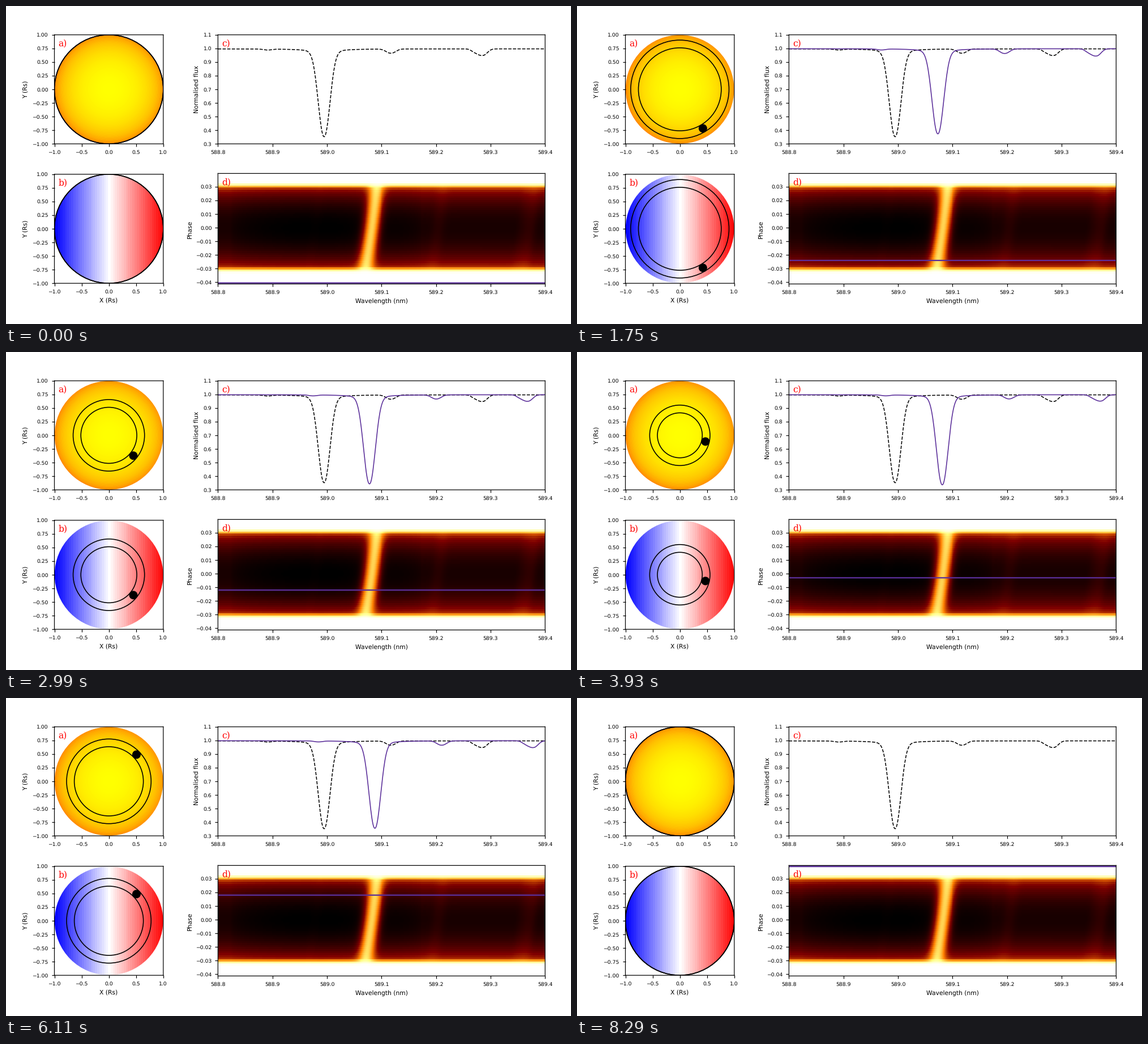
Write a matplotlib script that moves like this. It is 998x561 px and loops after 8.46 s.

```python
import numpy as np
import matplotlib.pyplot as plt
from matplotlib.animation import FuncAnimation
from matplotlib.patches import Circle
from matplotlib.ticker import MultipleLocator

W, H, DPI = 998, 561, 64
PX = 72 / DPI                      # one pixel in points
LOOP, TICK = 8460, 60
STEPS = 54
PURPLE = "#5b2f9a"
R_PLANET = 0.071
LIMB = 0.52
NM_PER_PX = 0.6 / 578

plt.rcParams.update({
    "font.family": "DejaVu Sans",
    "text.hinting": "none",
    "path.snap": False,
    "axes.linewidth": 1.23 * PX,
    "xtick.labelsize": 9.25 * PX, "ytick.labelsize": 9.25 * PX,
})
for side in ("xtick", "ytick"):
    plt.rcParams[side + ".major.size"] = 5.2 * PX
    plt.rcParams[side + ".major.pad"] = 5.6 * PX
    plt.rcParams[side + ".major.width"] = 1.23 * PX


# --- model -----------------------------------------------------------------

def phase_at(step):
    return -0.0405 + 0.0015 * step


def planet_xy(phase):
    x = 0.4755 + 1.95 * phase - 9.4 * phase ** 2
    y = 4.585 * np.sin(2 * np.pi * phase) - 0.0275
    return x, y


def intensity(r):
    mu = np.sqrt(1 - np.minimum(r, 0.995) ** 2)
    return 1 - LIMB * (1 - mu)


def coverage(dist):
    """Share of the planet's disc that lies over the star."""
    t = np.clip((1 + R_PLANET - dist) / (2 * R_PLANET), 0, 1)
    return t * t * (3 - 2 * t)


def dip(dx, centre, depth, width, power=2.2):
    return depth * np.exp(-(np.abs(dx - centre) / width) ** power)


def spectrum(wave, centre, floor=0.352, minor=1.0, level=0.997):
    """One strong line with wide wings and a few weak companions."""
    dx = (wave - centre) / NM_PER_PX
    wing = 0.03 / (1 + (dx / 25) ** 2)
    main = dip(dx, 0, level - 0.03 - floor, 14.2, 2.1)
    weak = (dip(dx, -100, 0.007, 10) + dip(dx, 118, 0.031, 11.5)
            + dip(dx, 266, 0.02, 8.5) + dip(dx, 280, 0.048, 11))
    return level - wing - main - minor * weak


def local_spectrum(wave, phase):
    x, y = planet_xy(phase)
    d3 = min(np.hypot(x, y), 1) ** 3
    return spectrum(wave, 588.999 + 0.175 * x, 0.3276 + 0.079 * d3,
                    0.92 + 0.3 * d3, 0.998)


def transit_map(wave):
    spread = np.clip(1 - ((wave - 588.999) / 0.175) ** 2, 0, 1)
    disc = 1 - 0.05 * np.sqrt(spread)
    rows = []
    for step in range(STEPS):
        phase = phase_at(step)
        dist = np.hypot(*planet_xy(phase))
        blocked = 0.955 * coverage(dist) * intensity(dist) / intensity(0.476)
        rows.append(1 - blocked * local_spectrum(wave, phase) / disc)
    return np.array(rows)


# --- layout ----------------------------------------------------------------

fig = plt.figure(figsize=(W / DPI, H / DPI), dpi=DPI, facecolor="white")


def panel(left, top, right, bottom, xlim, ylim, xstep, ystep):
    ax = fig.add_axes([left / W, 1 - bottom / H,
                       (right - left) / W, (bottom - top) / H])
    ax.set(xlim=xlim, ylim=ylim)
    ax.xaxis.set_major_locator(MultipleLocator(xstep))
    ax.yaxis.set_major_locator(MultipleLocator(ystep))
    ax.ticklabel_format(useOffset=False)
    return ax


def label(x, y, text, size=10.8, **kw):
    kw = {"ha": "center", "va": "center", **kw}
    fig.text(x / W, 1 - y / H, text, fontsize=size * PX, **kw)


UNIT, WAVES = (-1, 1), (588.8, 589.4)
ax_a = panel(85.5, 50.8, 277.8, 243.2, UNIT, UNIT, 0.5, 0.25)
ax_b = panel(85.5, 296.8, 277.8, 489.2, UNIT, UNIT, 0.5, 0.25)
ax_c = panel(374.4, 50.8, 952.3, 243.2, WAVES, (0.3, 1.1), 0.1, 0.1)
ax_d = panel(374.4, 295.4, 952.3, 490.4, WAVES, (-0.04125, 0.03975), 0.1, 0.01)

label(181.6, 520, "X (Rs)")
label(663, 521, "Wavelength (nm)")
label(34.3, 147.5, "Y (Rs)", rotation=90)
label(34.3, 393.5, "Y (Rs)", rotation=90)
label(337, 147, "Normalised flux", rotation=90)
label(324.3, 394, "Phase", rotation=90)
for x, y, text in ((92.5, 66, "a)"), (92.5, 312.3, "b)"),
                   (381.5, 66, "c)"), (381.5, 311, "d)")):
    label(x, y, text, 15.5, ha="left", color="red", family="DejaVu Serif")


# --- static pictures -------------------------------------------------------

def star(ax, values, cmap, vmin, vmax):
    img = ax.imshow(values, cmap=cmap, vmin=vmin, vmax=vmax, origin="lower",
                    extent=(-1, 1, -1, 1), aspect="auto",
                    interpolation="nearest")
    img.set_clip_path(Circle((0, 0), 0.997, transform=ax.transData))


axis = (np.arange(384) + 0.5) / 192 - 1
gx, gy = np.meshgrid(axis, axis)
radius = np.round(np.hypot(gx, gy) * 40) / 40
star(ax_a, intensity(radius), "autumn", 0, 1)
star(ax_b, np.round(gx * 25) / 25, "bwr", -1, 1)

wave = np.linspace(*WAVES, 579)
ax_c.plot(wave, spectrum(wave, 588.9947), "k--", lw=1.54 * PX)
ax_d.imshow(transit_map(wave), cmap="afmhot", vmin=0, vmax=1, origin="lower",
            extent=(*WAVES, *ax_d.get_ylim()), aspect="auto",
            interpolation="nearest")


# --- moving parts ----------------------------------------------------------

def add_circle(ax, fill):
    c = Circle((0, 0), 1, fill=fill, fc="black", ec="black",
               lw=(1.3 if fill else 1.6) * PX)
    return ax.add_patch(c)


rings = [(add_circle(ax, False), add_circle(ax, False)) for ax in (ax_a, ax_b)]
planets = [add_circle(ax, True) for ax in (ax_a, ax_b)]
curve, = ax_c.plot([], [], color=PURPLE, lw=1.6 * PX)
marker = ax_d.axhline(0, color=PURPLE, lw=2.3 * PX)

holds = [170, 170, 130] * 14 + [170, 130, 170] * 4
starts = np.cumsum([0] + holds[:-1])


def update(i):
    step = np.searchsorted(starts, (i + 1) * TICK - 1, side="right") - 1
    phase = phase_at(step)
    x, y = planet_xy(phase)
    dist = np.hypot(x, y)
    for inner, outer in rings:
        inner.set_radius(min(1, dist - R_PLANET))
        outer.set_radius(min(1, dist + R_PLANET))
    for planet in planets:
        planet.set_center((x, y))
        planet.set_radius(R_PLANET)
    if coverage(dist) > 0:
        curve.set_data(wave, local_spectrum(wave, phase))
    else:
        curve.set_data([], [])
    marker.set_ydata([phase, phase])
    return []


anim = FuncAnimation(fig, update, frames=LOOP // TICK, interval=TICK,
                     repeat=True, repeat_delay=0, blit=False)
plt.show()
```
